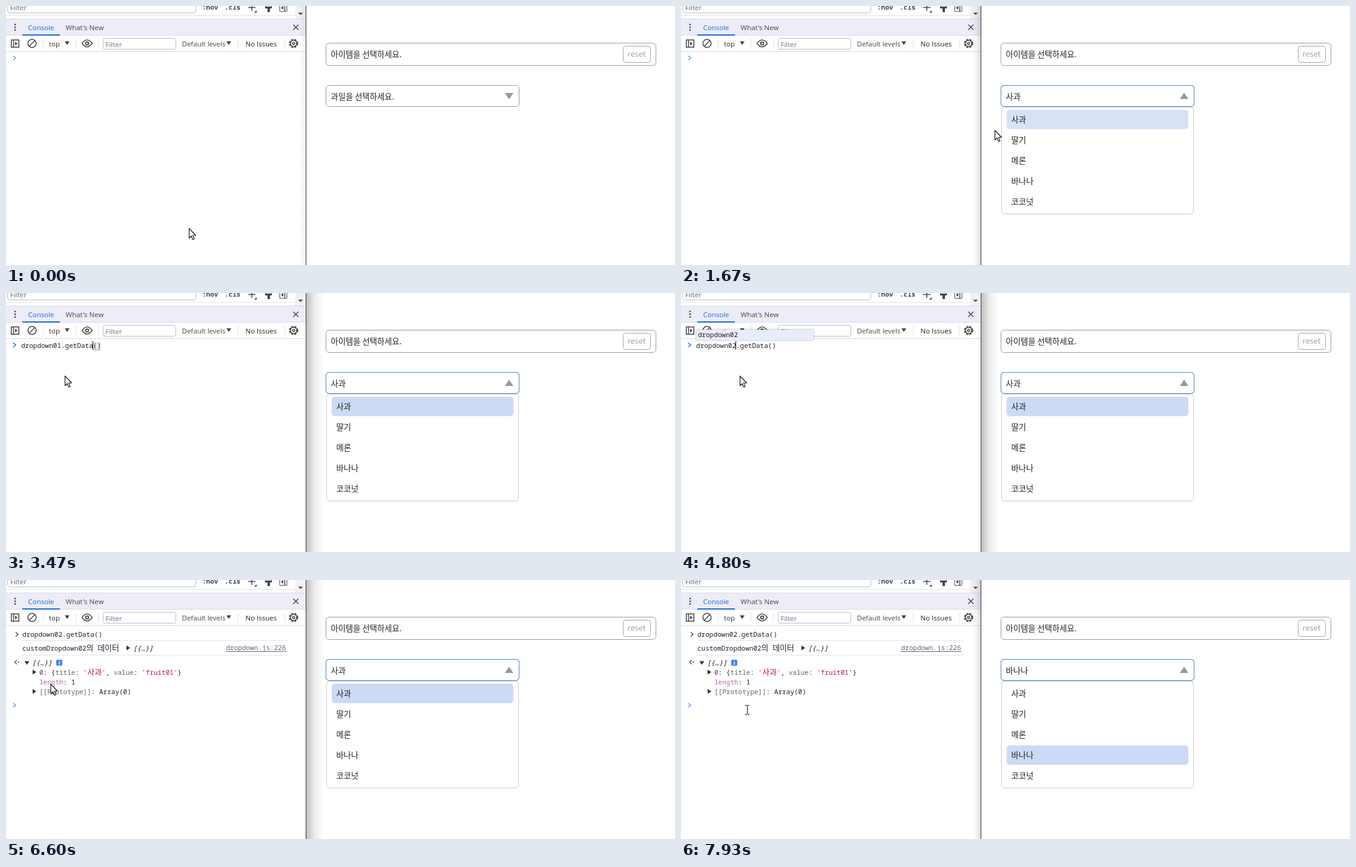
An HTML page with a canvas for the animation above (8 s loop, 1105 by 429 pixels).

```html
<!DOCTYPE html>
<html lang="ko">
<head>
<meta charset="utf-8">
<title>Dropdown demo</title>
<style>
html, body { margin: 0; width: 100%; height: 100%; overflow: hidden; background: #fff; }
canvas { display: block; }
</style>
</head>
<body>
<canvas id="stage" width="1105" height="429"></canvas>
<script>
const ctx = document.getElementById('stage').getContext('2d');
const LOOP = 8000, TICK = 1000 / 15;
const UI = '11.5px "Open Sans", sans-serif';
const MONO = '11px "Noto Sans Mono", monospace';
const KO_MONO = '13px "Noto Sans CJK KR", sans-serif';
const KO = '13.333px "Noto Sans CJK KR", "Noto Sans CJK", sans-serif';
const CHAR = 6.6, DARK = '#202124', GREY = '#5f6368', BLUE = '#1a68d8';
const FRUITS = ['사과', '딸기', '메론', '바나나', '코코넛'];

const OPEN = 870, PICK_1 = 1470, FOCUS = 2270, RECALL = 2470, HINT = 3070, HINT_END = 3470;
const DELETE = 4600, SUGGEST = 4670, RETYPE = 4800, SUGGEST_END = 5130, ENTER = 5200;
const EXPAND = 6400, PICK_2 = 7470;

// [time, x, y] of the pointer tip
const PATH = [
  [0, 302, 368], [130, 320, 350], [470, 520, 225], [730, 622, 160], [870, 625, 153],
  [1000, 622, 176], [1130, 619, 194], [1330, 618, 196], [1470, 612, 197], [1670, 518, 205.5],
  [1870, 270, 172], [2070, 125, 142], [2270, 97, 137], [5670, 97, 137], [5930, 25, 142.5],
  [6200, 32, 139], [6400, 33, 138], [6530, 57, 166], [6670, 90, 178], [6930, 430, 262],
  [7130, 621, 286], [7270, 613, 288], [7470, 611, 288], [7600, 500, 270], [7800, 190, 224], [7930, 109, 215]
];
// [time, caret column]
const CARET = [[FOCUS, 0], [RECALL, 20], [3000, 19], [3470, 18], [3530, 16], [3600, 14],
  [3670, 12], [3870, 11], [4070, 10], [4400, 9], [RETYPE, 10]];

const clamp = v => Math.max(0, Math.min(1, v));
const fade = (t, start) => clamp((t - start) / 260);

function pointerAt(t) {
  const i = PATH.findIndex(p => p[0] > t);
  if (i < 0) return PATH[PATH.length - 1].slice(1);
  const [t0, x0, y0] = PATH[i - 1], [t1, x1, y1] = PATH[i];
  const f = (t - t0) / (t1 - t0);
  return [x0 + (x1 - x0) * f, y0 + (y1 - y0) * f];
}

function rect(x, y, w, h, color) {
  ctx.fillStyle = color;
  ctx.fillRect(x, y, w, h);
}

function box(x, y, w, h, r, fill, stroke) {
  ctx.beginPath();
  ctx.roundRect(x, y, w, h, r);
  if (fill) { ctx.fillStyle = fill; ctx.fill(); }
  if (stroke) { ctx.strokeStyle = stroke; ctx.lineWidth = 1; ctx.stroke(); }
}

function poly(points, fill) {
  ctx.beginPath();
  points.forEach(([x, y]) => ctx.lineTo(x, y));
  ctx.closePath();
  ctx.fillStyle = fill;
  ctx.fill();
}

function line(points, color, width = 1) {
  ctx.beginPath();
  points.forEach(([x, y], i) => i ? ctx.lineTo(x, y) : ctx.moveTo(x, y));
  ctx.strokeStyle = color;
  ctx.lineWidth = width;
  ctx.stroke();
}

function ring(x, y, r, color, width) {
  ctx.beginPath();
  ctx.arc(x, y, r, 0, Math.PI * 2);
  ctx.strokeStyle = color;
  ctx.lineWidth = width;
  ctx.stroke();
}

function text(s, x, y, font, color) {
  ctx.font = font;
  ctx.fillStyle = color;
  ctx.fillText(s, x, y);
}

// Console text from [string, colour] pairs; Hangul uses its own face.
function code(x, y, parts, style = '') {
  for (const [s, color] of parts) {
    for (const run of s.match(/[가-힣]+|[^가-힣]+/g) || []) {
      text(run, x, y, style + (/[가-힣]/.test(run) ? KO_MONO : MONO), color);
      x += ctx.measureText(run).width;
    }
  }
}

const chevron = (x, y, color) => line([[x, y - 3.5], [x + 4, y], [x, y + 3.5]], color, 1.4);
const downMark = (x, y, w, h, color) => poly([[x - w, y - h], [x + w, y - h], [x, y + h]], color);
const rightMark = (x, y) => poly([[x, y - 4], [x + 6, y], [x, y + 4]], '#333');

function drawStylesStrip() {
  box(2.5, -9.5, 311, 21, 4, '#fff', '#b9bdc7');
  text('Filter', 7, 7, UI, '#666');
  text(':hov', 324, 6, 'bold ' + MONO, '#444');
  text('.cls', 361, 6, 'bold ' + MONO, '#444');
  line([[400, 2.5], [412, 2.5]], '#444', 1.5);
  line([[406, -3], [406, 8]], '#444', 1.5);
  poly([[410, 11], [414, 7], [414, 11]], '#444');
  box(428.5, -4.5, 10, 8, 1, null, '#444');
  rect(428, 1, 11, 3, '#444');
  rect(432, 4, 4, 6, '#444');
  box(452, -4, 12, 13, 1, null, '#444');
  line([[460.5, -4], [460.5, 9]], '#444', 1.5);
  poly([[454, 3], [458, 0], [458, 6]], '#444');
  rect(0, 15, 478, 1, '#e1e4ea');
  rect(478, 0, 17, 21, '#f1f1f1');
  downMark(486.5, 13, 4, 2, '#505050');
}

function drawToolbar() {
  rect(0, 21, 495, 28, '#ecedf6');
  rect(0, 21, 495, 1, '#d6dbe8');
  rect(0, 48, 495, 1, '#d3dcec');
  for (const y of [30.5, 35, 39.5]) rect(13.8, y - 1, 2.4, 2.4, '#444');
  text('Console', 36.5, 40, UI, BLUE);
  text("What's New", 98.5, 40, UI, '#474747');
  rect(27, 47, 62, 2, BLUE);
  line([[474.5, 31], [483, 39.5]], '#444', 1.4);
  line([[483, 31], [474.5, 39.5]], '#444', 1.4);

  rect(0, 75, 495, 1, '#d3dcec');
  for (const x of [61, 115, 152, 383, 460]) rect(x, 54, 1, 16, '#dce3ee');
  ctx.lineWidth = 1.5;
  ctx.strokeStyle = '#444';
  ctx.strokeRect(8.75, 56.25, 12.5, 12);
  line([[12.5, 56], [12.5, 68]], '#444', 1.5);
  poly([[15, 59], [19, 62.3], [15, 65.5]], '#444');
  ring(43, 62, 6.8, '#444', 1.5);
  line([[38.3, 66.7], [47.7, 57.3]], '#444', 1.5);
  text('top', 71, 67, UI, '#333');
  downMark(101, 61.5, 4, 3, '#444');
  ctx.beginPath();
  ctx.moveTo(125.5, 62);
  ctx.quadraticCurveTo(134, 50.5, 142.5, 62);
  ctx.quadraticCurveTo(134, 73.5, 125.5, 62);
  ctx.strokeStyle = '#444';
  ctx.lineWidth = 1.5;
  ctx.stroke();
  ring(134, 62, 2.4, '#444', 1.8);
  box(160.5, 53.5, 120, 18, 3, '#fff', '#b9bdc7');
  text('Filter', 164.5, 67.5, UI, '#70757a');
  text('Default levels', 290.5, 66.5, UI, '#474747');
  downMark(368, 61.5, 4, 3, '#444');
  text('No Issues', 395.5, 66.5, UI, '#222');
  ctx.setLineDash([3.4, 2]);
  ring(475, 62, 6.6, '#444', 2);
  ctx.setLineDash([]);
  ring(475, 62, 5.2, '#444', 1.5);
  ring(475, 62, 1.8, '#444', 1.5);
}

function popup(x, y, w, h) {
  ctx.save();
  ctx.shadowColor = 'rgba(0,0,0,.35)';
  ctx.shadowBlur = 3;
  rect(x, y, w, h, '#fff');
  ctx.restore();
}

function drawPrompt(t) {
  chevron(12, 86, t < RECALL ? '#5b9cec' : BLUE);
  if (t < FOCUS) return;
  const col = CARET.filter(c => c[0] <= t).pop()[1];
  if (t >= RECALL) {
    if (col >= 18) {
      rect(25 + 18 * CHAR, 81, 2 * CHAR, 13, '#ececec');
      rect(25 + 18 * CHAR, 94, 2 * CHAR, 1, '#aaa');
    }
    const digit = t < DELETE ? '1' : t < RETYPE ? '' : '2';
    code(25, 91, [['dropdown0' + digit + '.getData()', DARK]]);
  }
  rect(Math.round(25 + col * CHAR) - 1, 80, 1, 14, '#000');
  if (t >= HINT && t < HINT_END) {
    popup(148, 59, 26, 17);
    code(151, 71, [['ƒ()', DARK]]);
  }
  if (t >= SUGGEST && t < SUGGEST_END) {
    popup(25, 61, 194, 17);
    rect(25, 61, 194, 17, '#e8eef9');
    code(28, 73, [['dropdown02', DARK]]);
  }
}

function drawOutput(t, px, py) {
  const expanded = t >= EXPAND;
  if (!expanded && py > 129 && py < 146) rect(0, 129, 77, 16, '#f1f1f1');
  chevron(16, 90, '#444');
  code(27, 94, [['dropdown02.getData()', DARK]]);
  rect(27, 100, 439, 1, '#d6e4f7');
  code(27, 117, [['customDropdown02의 데이터', DARK]]);
  rightMark(199, 112.5);
  code(210, 117, [['[{…}]', DARK]], 'italic ');
  code(363.5, 116, [['dropdown.js:226', GREY]]);
  rect(363, 118, 100, 1, GREY);
  rect(27, 124, 439, 1, '#d6e4f7');
  line([[18, 132.5], [14.5, 136], [18, 139.5]], '#555', 1.3);
  rect(19.5, 135, 2, 2, '#555');
  code(43, 141, [['[{…}]', DARK]], 'italic ');
  if (!expanded) {
    rightMark(32, 136.5);
    chevron(12, 159.5, '#5b9cec');
    return;
  }
  downMark(34.5, 137.5, 4, 3, '#333');
  box(83, 132, 10, 10, 2, '#4285f4');
  rect(87.3, 134, 1.5, 1.5, '#fff');
  rect(87.3, 136.5, 1.5, 4, '#fff');
  const RED = '#c41245';
  rightMark(44, 152.5);
  code(55, 157, [['0', '#8b1a75'], [': {', DARK], ['title', GREY], [': ', DARK], ["'사과'", RED],
    [', ', DARK], ['value', GREY], [': ', DARK], ["'fruit01'", RED], ['}', DARK]]);
  code(55, 173, [['length', '#b06fae'], [': 1', DARK]]);
  rightMark(44, 184.5);
  code(55, 189, [['[[Prototype]]', GREY], [': Array(0)', DARK]]);
  chevron(12, 207.5, '#5b9cec');
}

function drawDropdown(t, px, py) {
  box(528.5, 61.5, 545, 37, 5, '#fff', '#9b9b9b');
  text('아이템을 선택하세요.', 536.5, 85, KO, '#222');
  box(1019.5, 66.5, 45, 27, 4, '#fff', '#a5a5a5');
  text('reset', 1026.5, 84, '13px "Noto Sans CJK KR", sans-serif', '#a5a5a5');

  const open = t >= OPEN;
  box(528.5, 131.5, 319, 35, 5, '#fff', '#9b9b9b');
  ctx.globalAlpha = fade(t, OPEN);
  box(528.5, 131.5, 319, 35, 5, null, '#4a86d0');
  ctx.globalAlpha = 1;
  const label = t < PICK_1 ? '과일을 선택하세요.' : FRUITS[t < PICK_2 ? 0 : 3];
  text(label, 536.5, 155, KO, '#222');
  poly(open ? [[824, 154], [838, 154], [831, 143.5]] : [[824, 144], [838, 144], [831, 154.5]], '#999');
  if (!open) return;

  box(529.5, 167.5, 317, 177, 5, '#fff', '#cacaca');
  FRUITS.forEach((name, i) => {
    const y = 172 + i * 34;
    if (px >= 538 && px <= 838 && py >= y && py < y + 32) box(538, y, 300, 32, 5, '#f4f4f4');
    const picked = i === 0 ? fade(t, PICK_1) * (1 - fade(t, PICK_2)) : i === 3 ? fade(t, PICK_2) : 0;
    if (picked) {
      ctx.globalAlpha = picked;
      box(538, y, 300, 32, 5, '#ccdaf5');
      ctx.globalAlpha = 1;
    }
    text(name, 545.5, y + 21, KO, '#222');
  });
}

function drawWindowEdge(t) {
  const left = t < FOCUS || t >= PICK_2;
  const reach = left ? -14 : 30;
  const strength = left ? (t < OPEN ? 0.08 : 0.17) : 0.26;
  const shade = ctx.createLinearGradient(495.5, 0, 495.5 + reach, 0);
  shade.addColorStop(0, `rgba(0,0,0,${strength})`);
  shade.addColorStop(0.45, `rgba(0,0,0,${strength * 0.3})`);
  shade.addColorStop(1, 'rgba(0,0,0,0)');
  rect(left ? 481 : 496, 0, left ? 14 : 30, 429, shade);
  rect(495, 0, 1, 429, '#3c3c3c');
}

function strokeShape(path, x, y) {
  ctx.save();
  ctx.translate(x, y);
  const shape = new Path2D(path);
  ctx.lineWidth = 1.1;
  ctx.lineJoin = 'round';
  ctx.fillStyle = '#fff';
  ctx.strokeStyle = '#101018';
  ctx.fill(shape);
  ctx.stroke(shape);
  ctx.restore();
}

function drawPointer(t, x, y) {
  const overSelect = x >= 529 && x <= 847 && y >= 132 && y <= (t >= OPEN ? 340 : 166);
  const overPrompt = t >= EXPAND && x < 495 && y >= 199 && y <= 222;
  if (overSelect) {
    strokeShape('M-1.5 1.5Q0 -.5 1.5 1.5V8.5Q3.5 7 5 9Q7 7.8 8.3 10Q10.5 9.5 11 12V16Q10.5 19 9 20.5V23H0V21Q-2 18.5 -5 14.5Q-5.8 11.5 -3.5 12L-1.5 14Z', x, y);
    line([[x + 1.5, y + 8.5], [x + 1.5, y + 12]], '#101018');
    line([[x + 5, y + 9], [x + 5, y + 12.5]], '#101018');
    line([[x + 8.3, y + 10], [x + 8.3, y + 13]], '#101018');
  } else if (overPrompt) {
    const cx = Math.round(x), cy = Math.round(y);
    rect(cx, cy - 7, 1, 14, '#111');
    for (const dy of [-8, 7]) {
      rect(cx - 3, cy + dy, 3, 1, '#111');
      rect(cx + 1, cy + dy, 3, 1, '#111');
    }
  } else {
    strokeShape('M.5 .5V16.5L4 13L6.6 19L9 18L6.5 12H11.5Z', x, y);
  }
}

function draw(t) {
  const [px, py] = pointerAt(t);
  rect(0, 0, 1105, 429, '#fff');
  drawStylesStrip();
  drawToolbar();
  if (t < ENTER) drawPrompt(t);
  else drawOutput(t, px, py);
  drawDropdown(t, px, py);
  drawWindowEdge(t);
  drawPointer(t, px, py);
}

const start = performance.now();
function loop() {
  const t = (performance.now() - start) % LOOP;
  draw(Math.round(Math.floor((t + 4) / TICK) * TICK / 10) * 10 % LOOP);
  requestAnimationFrame(loop);
}
loop();
</script>
</body>
</html>
```
